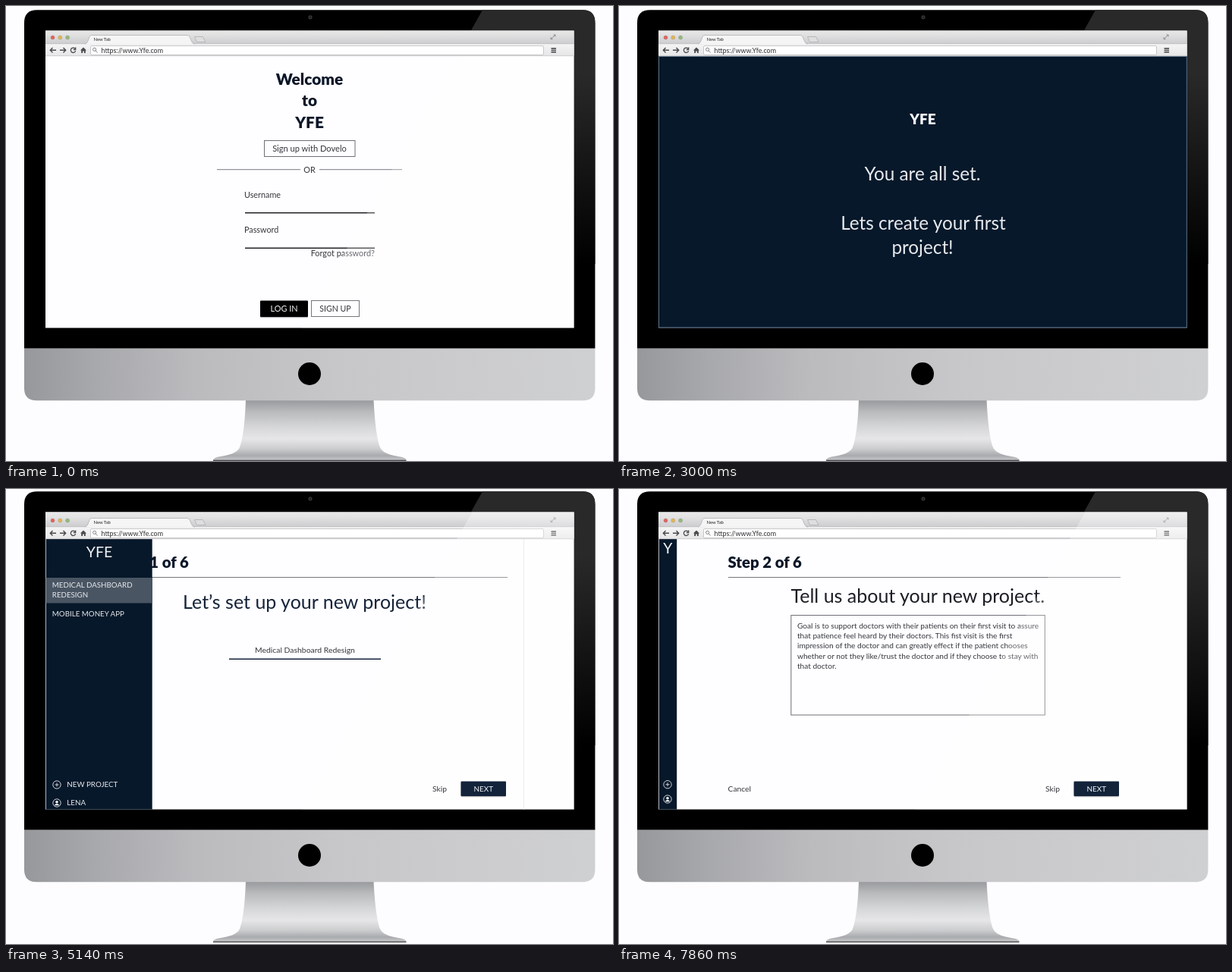
Recreate the animation shown at these times as an HTML page. Size 800x600 px, loop 8000 ms.

```html
<!DOCTYPE html>
<html lang="en">
<head>
<meta charset="utf-8">
<title>Onboarding walkthrough</title>
<style>
  html, body { margin: 0; height: 100%; overflow: hidden; background: #fdfcfe; }
  svg { display: block; width: 800px; height: 600px; }
  text { font-family: Lato, "Open Sans", sans-serif; white-space: pre; }
</style>
</head>
<body>
<svg id="stage" viewBox="0 0 800 600"></svg>
<script>
const LOOP = 8000;
const NAVY = '#07182a', INK = '#34373c', PAPER = '#fefdff';

const text = (x, y, str, size = 10.8, fill = INK, anchor = 'start', weight = 400) =>
  `<text x="${x}" y="${y}" font-size="${size}" fill="${fill}" text-anchor="${anchor}" font-weight="${weight}">${str}</text>`;
const middle = (x, y, str, size, fill, weight) => text(x, y, str, size, fill, 'middle', weight);
const rect = (x, y, w, h, fill, extra = '') =>
  `<rect x="${x}" y="${y}" width="${w}" height="${h}" fill="${fill}" ${extra}/>`;
const box = (x, y, w, h, stroke = '#6d7076') => rect(x, y, w, h, 'none', `stroke="${stroke}"`);
const path = (d, stroke, width = 1, fill = 'none') =>
  `<path d="${d}" stroke="${stroke}" stroke-width="${width}" fill="${fill}"/>`;
const circle = (x, y, r, fill, extra = '') => `<circle cx="${x}" cy="${y}" r="${r}" fill="${fill}" ${extra}/>`;
const gradient = (id, vertical, stops) =>
  `<linearGradient id="${id}" x1="0" y1="0" x2="${+!vertical}" y2="${+vertical}">` +
  stops.map(([at, color]) => `<stop offset="${at}" stop-color="${color}"/>`).join('') + '</linearGradient>';

const button = (x, y, w, h, label, fill, size = 10) =>
  rect(x, y + 1.2, w, h, '#000', 'rx="1.5" opacity=".28"') +
  rect(x, y, w, h, fill, 'rx="1"') + middle(x + w / 2, y + h / 2 + 3.7, label, size, '#f4f5f7');
const outlined = (x, y, w, h, label, size = 10) =>
  rect(x, y, w, h, PAPER, 'stroke="#74777c"') + middle(x + w / 2, y + h / 2 + 3.8, label, size);
const shine = `<path d="M594 66H749V425H389Z" fill="${PAPER}" opacity=".25"/>`;

const title = y => ['Welcome', 'to', 'YFE']
  .map((word, i) => middle(400, y + i * 28.3, word, 20.8, '#0a1628', 900)).join('');

const login = title(104) + box(340.5, 177.5, 119.5, 21) +
  middle(400, 192, 'Sign up with Dovelo', 11.1) +
  path('M278 215.7H388M413 215.7H522', '#777b80') + middle(400, 219.8, 'OR') +
  text(314, 253, 'Username') + text(314, 299, 'Password') +
  path('M315 272.8H486M315 319.3H486', '#202226', 1.5) +
  text(486, 330, 'Forgot password?', 10.9, INK, 'end') + shine +
  button(335, 388.5, 63, 21.5, 'LOG IN', '#000', 10.9) + outlined(402.5, 388.5, 63, 21, 'SIGN UP', 10.6);

const invite = title(101) + text(315, 190, 'Don’t do it alone. Invite your team!') +
  [208.5, 234.5, 260.5].map(y => box(315.5, y, 170, 21.5) + text(324, y + 14.5, 'Team email', 10.7, '#909297')).join('') +
  shine + rect(315, 309, 171, 22, '#000', 'rx="1" opacity=".25"') + rect(315, 307.5, 170.5, 22, PAPER) +
  middle(400, 322.6, 'Add Team Mates', 10.8, '#0a1628', 700) +
  outlined(335.5, 388.5, 62.5, 21.5, 'SKIP') + button(402.5, 388.5, 62, 21.5, 'INVITE', '#050608');

const allSet = rect(52, 66, 697, 359, NAVY) + path('M52.5 66.5H748.3V424H52.5Z', '#5d768c') +
  middle(400.5, 156, 'YFE', 19, '#fff', 900) +
  middle(400, 230, 'You are all set.', 24.3, '#e6eaee') +
  middle(401, 294.5, 'Lets create your first', 24.3, '#e6eaee') +
  middle(400, 327, 'project!', 24.3, '#e6eaee');

const step = (n, body) => text(143.5, 104, `Step ${n} of 6`, 20.3, '#0a1628', 'start', 900) +
  path('M144 116.5H661', '#73767b') + body + shine + text(562, 398.8, 'Skip', 10.3) +
  button(599.5, 385.5, 59.5, 19.5, 'NEXT', '#12233a', 9.9);

const stepOne = step(1,
  middle(393.5, 158, 'Let’s set up your new project!', 25, '#16243a') +
  middle(394, 216.3, 'Medical Dashboard Redesign', 10.4) + path('M294 224.3H494', '#13233a', 1.5));

const stepTwo = body => step(2,
  middle(393.8, 150, 'Tell us about your new project.', 25, '#1b1e24') +
  box(226.8, 166.5, 334.5, 131.5) + body + text(143.5, 398.8, 'Cancel', 10.3));
const placeholder = text(234.5, 184, 'Write a description of your product and your research goals.', 10.2, '#909297');
const goal = [
  'Goal is to support doctors with their patients on their first visit to assure',
  'that patience feel heard by their doctors. This fist visit is the first',
  'impression of the doctor and can greatly effect if the patient chooses',
  'whether or not they like/trust the doctor and if they choose to stay with',
  'that doctor.'
].map((line, i) => text(235, 184 + i * 13.2, line, 10.1)).join('');

const plusIcon = (x, y) => circle(x, y, 5.2, 'none', 'stroke="#dfe3e8" stroke-width=".9"') +
  path(`M${x - 2.5} ${y}h5M${x} ${y - 2.5}v5`, '#dfe3e8', .9);
const userIcon = (x, y) => circle(x, y, 5.2, 'none', 'stroke="#dfe3e8" stroke-width=".9"') +
  circle(x, y - 1.3, 1.8, '#fff') + path(`M${x - 3.5} ${y + 3.2}q3.5 -4.6 7 0z`, 'none', 0, '#fff');

const rail = rect(52.7, 66, 23.5, 359, NAVY) + middle(64.3, 85, 'Y', 19.5, '#f2f4f6') +
  plusIcon(64, 389.7) + userIcon(64, 409);
const drawer = rect(52.7, 66, 140, 359, NAVY) + rect(52.7, 117, 140, 33.5, '#4a5563') +
  middle(123, 90, 'YFE', 19.5, '#f2f4f6') +
  [['MEDICAL DASHBOARD', 130], ['REDESIGN', 143.3], ['MOBILE MONEY APP', 167.8]]
    .map(([label, y]) => text(60.8, y, label, 9.75, '#e6e9ed')).join('') +
  plusIcon(67, 390) + text(80.3, 393.4, 'NEW PROJECT', 9.8, '#e6e9ed') +
  userIcon(67, 414) + text(80.3, 417.3, 'LENA', 9.8, '#e6e9ed') +
  path('M682.5 66V423', '#ececf0');

const chrome = rect(52, 28, 697, 22, 'url(#strip)') + rect(52, 50, 697, 16, 'url(#toolbar)') +
  path('M52 49.8H749', '#b4b4b6', .6) + path('M52 65.7H749', '#c2c2c4', .7) +
  ['#e2625c', '#e3b552', '#93ba78'].map((c, i) => circle(61.5 + i * 9.8, 41.5, 2.6, c, 'stroke="#999" stroke-width=".4"')).join('') +
  path('M104 50.2Q107 49.5 108.5 45L110 40.5Q110.8 38.5 113 38.5H239Q241 38.5 242 40.5L244.5 46.5Q246 50 249 50.2', '#aaaaac', .7, '#f5f5f6') +
  path('M248.5 40.5H259.5L263 47.5H251.5Z', '#a9a9ab', .7, '#dededf') +
  text(115.5, 46.3, 'New Tab', 5.9, '#222') +
  path('M718 43.7L724 38M721.5 38H724V40.5M718 41.2V43.7H720.5', '#858587', .9) +
  rect(111.5, 52.5, 597, 12, '#fff', 'rx="1.5" stroke="#bcbcbe" stroke-width=".8"') +
  path('M66 58.2H58.5M61.5 55L58.3 58.2L61.5 61.4M71 58.2H78.5M75.5 55L78.7 58.2L75.5 61.4', '#4a4a4c', 1.4) +
  path('M91 56.2A3.2 3.2 0 1 0 91.6 59.3M91.7 54.5V57.5H88.8', '#4a4a4c', 1.3) +
  path('M98 58.5L102 54.5L106 58.5H104.8V62H102.9V59.5H101.1V62H99.2V58.5Z', 'none', 0, '#4a4a4c') +
  circle(116.6, 57.3, 2.1, 'none', 'stroke="#77777a" stroke-width=".9"') + path('M118.2 59L120.6 61.4', '#77777a') +
  text(125.5, 61.5, 'https://www.Yfe.com', 8.9, '#2d2d30') +
  path('M718.5 56H725M718.5 58.4H725M718.5 60.8H725', '#3c3c3e', 1.4) +
  `<path id="chromeShine" d="M616 28H749V66H594Z" fill="#fff" opacity=".3"/>`;

const device =
  path('M316 519H484.5C486 550 489 572 493 582C496 589 505 592 520 594.5Q527 596 527.5 598.5H273Q273.5 596 280 594.5C296 592 305 589 308 582C312 572 315 550 316 519Z', 'none', 0, 'url(#stand)') +
  path('M273 599.3H527.5', '#4b4c4f', 1.6) +
  path('M24 451.5H776.4V504Q776.4 520.3 760 520.3H40.5Q24 520.3 24 504Z', 'none', 0, 'url(#chin)') +
  path('M24 451.5V22Q24 5.2 41 5.2H760Q776.4 5.2 776.4 22V451.5Z', 'none', 0, '#000') +
  path('M628 5.2H760Q776.4 5.2 776.4 22V340H749V32H613Z', 'none', 0, 'url(#bezel)') +
  circle(401, 14.8, 2.6, '#353638') + circle(401, 14.8, 1.1, '#15181d') +
  circle(400, 485, 15, '#000');

// Each scene: start time, device offset, light on the browser bar, content.
const scenes = [
  [0, 0, false, login],
  [1000, 0, false, invite],
  [2000, 0, true, invite],
  [3000, 0, false, allSet],
  [4140, 0, true, stepOne + rail],
  [5140, -2, true, stepOne + drawer],
  [6140, -2, true, stepTwo(placeholder) + rail],
  [7140, -2, true, stepTwo(goal) + rail]
];

const stage = document.getElementById('stage');
stage.innerHTML = '<defs>' +
  gradient('strip', true, [[0, '#ededee'], [.4, '#e2e2e3'], [1, '#cdcdcf']]) +
  gradient('toolbar', true, [[0, '#f5f5f6'], [1, '#e6e6e7']]) +
  gradient('chin', false, [[0, '#97989b'], [.12, '#a7a8ab'], [.3, '#bbbbbe'], [.55, '#c7c7ca'], [1, '#cfd0d2']]) +
  gradient('stand', true, [[0, '#97989b'], [.2, '#b9babc'], [.45, '#d5d6d8'], [.65, '#e6e6e8'], [.82, '#cbccce'], [.93, '#a9aaad'], [1, '#c5c6c8']]) +
  gradient('bezel', true, [[0, '#292929'], [.25, '#292929'], [1, '#000']]) +
  '<clipPath id="screen"><rect id="window" x="52" width="696.6" height="392"/></clipPath></defs>' +
  `<g id="device">${device}</g><g clip-path="url(#screen)">` +
  rect(52, 28, 697, 397, PAPER) + scenes.map(s => `<g class="scene">${s[3]}</g>`).join('') + chrome + '</g>';

const find = id => document.getElementById(id);
const groups = [...stage.querySelectorAll('.scene')];

function draw() {
  const time = performance.now() % LOOP;
  const current = scenes.findLastIndex(([start]) => time >= start);
  const [, offset, lit] = scenes[current];
  groups.forEach((group, i) => group.setAttribute('display', i === current ? 'inline' : 'none'));
  find('device').setAttribute('transform', `translate(0 ${offset})`);
  find('window').setAttribute('y', 32.5 + offset);
  find('chromeShine').setAttribute('display', lit ? 'inline' : 'none');
  requestAnimationFrame(draw);
}
draw();
</script>
</body>
</html>
```
